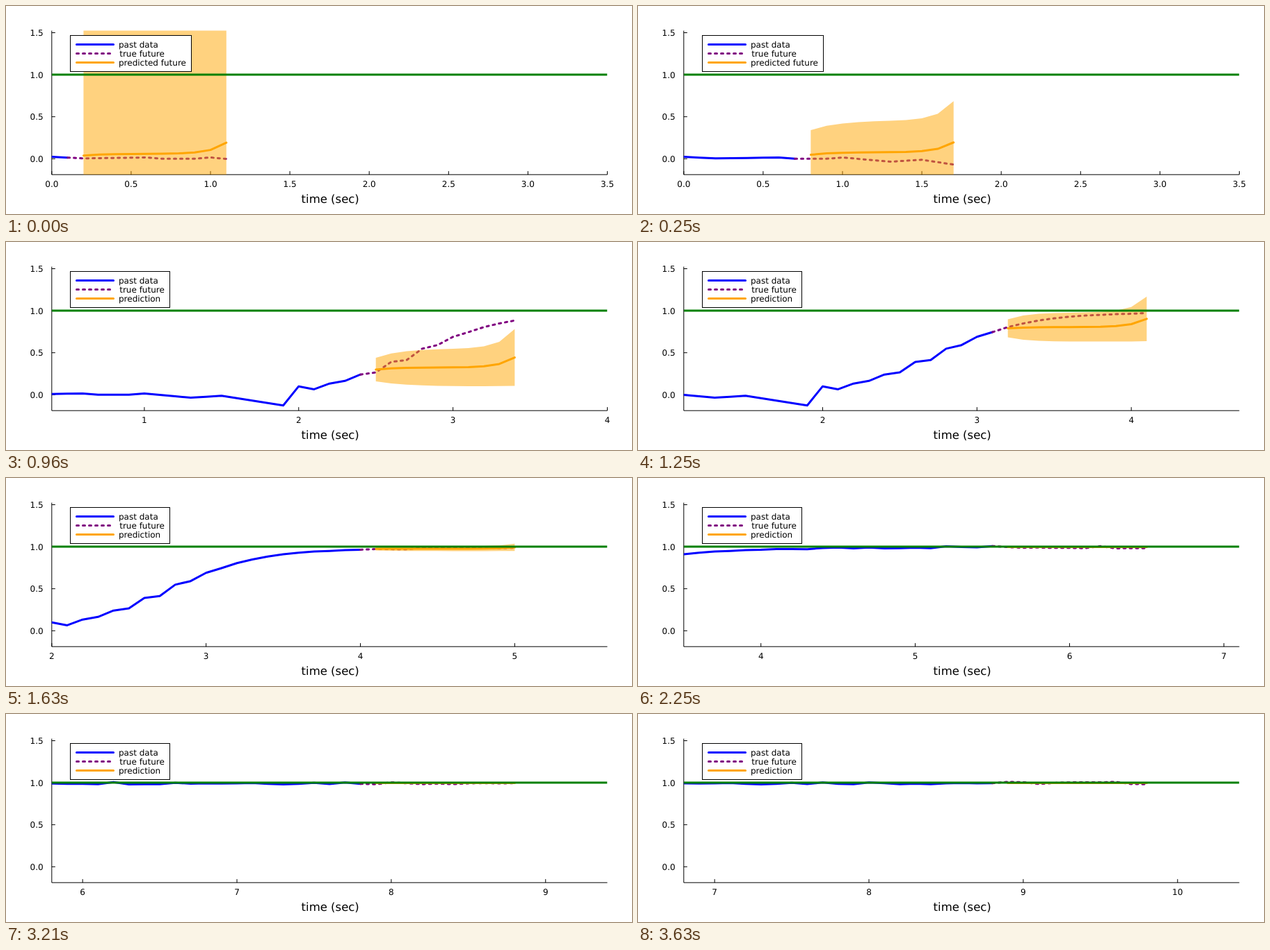
Recreate the animation shown at these times as an HTML page. Size 900 by 300 pixels, loop 3.68 s.

```html
<!DOCTYPE html>
<html lang="en">
<head>
<meta charset="utf-8">
<title>Rolling forecast</title>
<style>
  html, body { margin: 0; width: 100%; height: 100%; overflow: hidden; background: #fff; }
  svg { display: block; font: 12px "DejaVu Sans", sans-serif; text-rendering: geometricPrecision; }
  .axis { stroke: #000; fill: none; }
  .line { fill: none; stroke-width: 3; stroke-linejoin: round; stroke-linecap: round; }
  .past { stroke: #00f; }
  .truth { stroke: #800080; stroke-dasharray: 3 6; }
  .guess { stroke: #ffa500; }
  .goal { stroke: #008000; stroke-linecap: butt; }
  .band { fill: #ffa500; fill-opacity: .5; }
  .mid { text-anchor: middle; }
  .end { text-anchor: end; }
</style>
</head>
<body>
<svg width="900" height="300" viewBox="0 0 900 300">
  <defs><clipPath id="plot"><rect x="65.8" y="35.6" width="798.7" height="207.6"/></clipPath></defs>
  <path class="axis" d="M65.8 35.6V243.2H864.5M65.8 220.3h5M65.8 159.7h5M65.8 99.1h5M65.8 38.5h5"/>
  <g class="end">
    <text x="53.6" y="224.7">0.0</text>
    <text x="53.6" y="164.1">0.5</text>
    <text x="53.6" y="103.5">1.0</text>
    <text x="53.6" y="42.9">1.5</text>
  </g>
  <g id="ticks" class="mid"></g>
  <text class="mid" x="466.2" y="284" font-size="16.5">time (sec)</text>
  <g clip-path="url(#plot)">
    <path id="past" class="line past"/>
    <path id="truth" class="line truth"/>
    <path id="band" class="band"/>
    <path id="guess" class="line guess"/>
    <path class="line goal" d="M65.8 99.1H864.5"/>
  </g>
  <rect id="box" class="axis" x="92.5" y="42.5" height="52" style="fill:#fff"/>
  <path class="line past" d="M101.5 55.5H154.5"/>
  <path class="line truth" d="M101.5 68.5H154"/>
  <path class="line guess" d="M101.5 81.5H154.5"/>
  <text x="162" y="60">past data</text>
  <text x="163.2" y="73">true future</text>
  <text id="name" x="162" y="86"></text>
</svg>
<script>
const LOOP = 3680, STEP = 125 / 3, LAST = 87, HORIZON = 10;

const fall = (x, mid, width) => 1 / (1 + Math.exp((x - mid) / width));
const bell = (x, mid, width) => Math.exp(-(((x - mid) / width) ** 2));
const noise = i => {
  const r = Math.sin(i * 12.9898) * 43758.5453;
  return r - Math.floor(r);
};

// turning points of the signal before it climbs: [sample, value]
const idle = [[0, .023], [2, .004], [6, .015], [7, 0], [9, 0], [10, .015],
  [13, -.035], [15, -.012], [19, -.127], [20, .1], [21, .065]];

// ten samples per second: idle, stepped climb, then jitter around the goal
function sample(i) {
  const n = idle.findIndex(p => p[0] >= i);
  if (n === 0) return idle[0][1];
  if (n > 0) {
    const [a, u] = idle[n - 1], [b, v] = idle[n];
    return u + (v - u) * (i - a) / (b - a);
  }
  const zigzag = (i % 2 ? -.03 : .03) * bell(i, 26.5, 3);
  const jitter = .032 * (noise(i) - .62) * (1 - fall(i, 42, 2));
  return 1 - fall(i, 27.7, 3) + zigzag - .02 * bell(i, 40, 6) + jitter;
}

const signal = Array.from({ length: LAST + HORIZON + 2 }, (_, i) => sample(i));

// The model starts out ignorant, levels off mid-way and gains confidence near the goal.
function forecast(k, now) {
  const fresh = Math.exp(-k / 6), level = bell(k, 14, 6);
  const doubt = fall(k, 33, 3), follow = fall(k, 45, 3);
  const near = signal[now] + .061 * doubt * (1 - .6 * fresh);
  const base = .997 + (near - .997) * follow;
  return Array.from({ length: HORIZON }, (_, j) => {
    const tail = Math.exp((j - HORIZON + 1) / .95);
    const rise = tau => 1 - Math.exp(-j / tau);
    return {
      i: now + 1 + j,
      mean: base + doubt * ((.02 + .055 * level) * rise(1.2 + .4 * level) + (.134 - .098 * level) * tail),
      spread: 3 * fresh ** 3 + doubt * (.147 - .02 * level +
        (.09 - .03 * level) * rise(1.2 + 3.8 * level) + (.126 - .071 * level) * tail)
    };
  });
}

const $ = id => document.getElementById(id);
const yOf = v => 220.3 - 121.2 * v;
const path = pts => 'M' + pts.map(p => p[0].toFixed(2) + ' ' + p[1].toFixed(2)).join('L');

function draw(k) {
  const now = k + 1, rolling = now >= 20;
  const from = rolling ? now - 20 : 0, span = rolling ? 36 : 35;
  const xOf = i => 65.8 + (i - from) * 798.7 / span;
  const trace = (a, b) => path(signal.slice(a, b + 1).map((v, n) => [xOf(a + n), yOf(v)]));

  let ticks = '';
  const gap = rolling ? 10 : 5;
  for (let i = Math.ceil(from / gap) * gap; i <= from + span; i += gap) {
    const x = xOf(i).toFixed(2);
    ticks += `<path class="axis" d="M${x} 243.2v-5"/>` +
      `<text x="${x}" y="261.4">${(i / 10).toFixed(rolling ? 0 : 1)}</text>`;
  }
  $('ticks').innerHTML = ticks;

  const ahead = forecast(k, now);
  const edge = s => ahead.map(p => [xOf(p.i), yOf(p.mean + s * p.spread)]);
  $('past').setAttribute('d', trace(from, now));
  $('truth').setAttribute('d', trace(now, now + HORIZON));
  $('band').setAttribute('d', path([...edge(1), ...edge(-1).reverse()]) + 'Z');
  $('guess').setAttribute('d', path(edge(0)));
  $('box').setAttribute('width', rolling ? 143 : 174);
  $('name').textContent = rolling ? 'prediction' : 'predicted future';
}

let shown = -1;
const start = performance.now();
function tick() {
  const t = Math.max(0, performance.now() - start) % LOOP;
  // step starts are rounded to 10 ms
  const k = Math.min(LAST, Math.ceil((Math.floor(t / 10) * 10 + 5) / STEP) - 1);
  if (k !== shown) draw(shown = k);
  requestAnimationFrame(tick);
}
tick();
</script>
</body>
</html>
```
